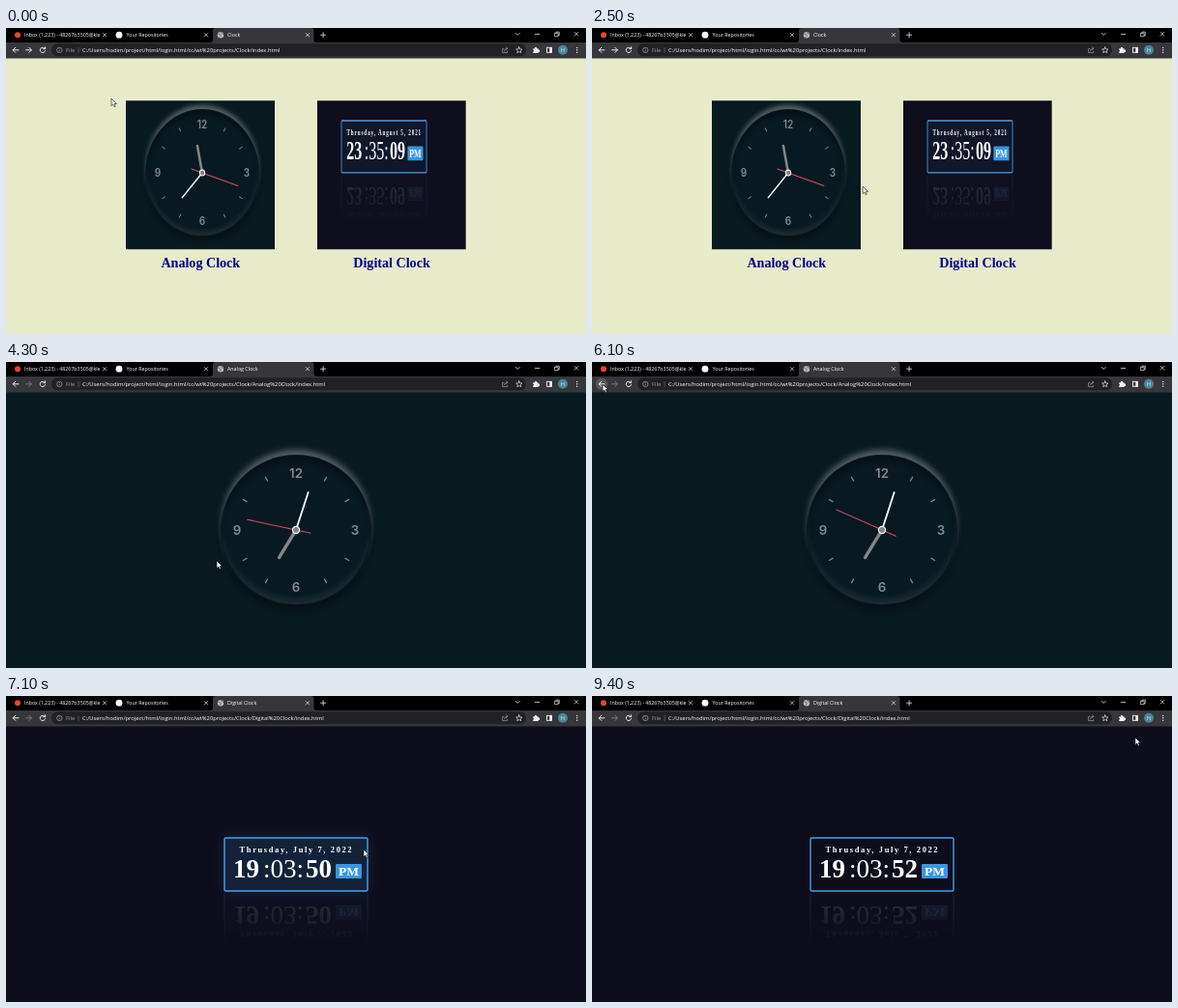
An HTML page that plays this animation: 600 by 317 pixels, repeating every 9500 ms.

```html
<!DOCTYPE html>
<html lang="en">
<head>
<meta charset="utf-8">
<title>Clock</title>
<style>
  html, body { margin: 0; width: 100%; height: 100%; overflow: hidden; background: #000; }
  svg { display: block; width: 100vw; height: 100vh; }
  .ui { font-family: "Open Sans", "Noto Sans", sans-serif; }
  .serif { font-family: "Liberation Serif", "Noto Serif", serif; }
  .caption { font-size: 14.1px; font-weight: 700; fill: #00008b; text-anchor: middle; }
  .num { font: 600 13.3px Inter, sans-serif; fill: #85898d; text-anchor: middle; }
  .line { fill: none; stroke: #e8eaed; stroke-linecap: round; stroke-linejoin: round; }
</style>
</head>
<body>
<svg id="stage" viewBox="0 0 600 317" xmlns="http://www.w3.org/2000/svg"></svg>
<script>
const LOOP = 9500, FRAME = 100;
const ANALOG_AT = 3800, BACK_AT = 6200, DIGITAL_AT = 7000;
const ROOT = 'C:/Users/hodim/project/html/login.html/cc/wt%20projects/Clock/';
const PAGES = {
  index: { title: 'Clock', path: 'index.html' },
  analog: { title: 'Analog Clock', path: 'Analog%20Clock/index.html' },
  digital: { title: 'Digital Clock', path: 'Digital%20Clock/index.html' }
};
// Pointer stops: time, x, y
const STOPS = [
  [0, 109, 73], [1100, 239.5, 110], [1600, 300, 148], [1700, 300, 148],
  [2000, 297, 153], [2200, 297, 153], [3200, 219, 204], [3500, 218, 206],
  [4300, 218, 206], [5800, 11, 23], [6100, 11, 23], [6800, 370, 159],
  [7100, 370, 159], [7600, 292, 182], [8000, 292, 182], [9400, 562, 43]
];

const clamp = v => Math.max(0, Math.min(1, v));
const ease = v => v * v * (3 - 2 * v);
const ramp = (t, from, to) => ease(clamp((t - from) / (to - from)));
const $ = id => document.getElementById(id);

const line = (d, width = 0.9, extra = '') =>
  `<path class="line" d="${d}" stroke-width="${width}" ${extra}/>`;
const cross = (x, y, r) => line(`M${x - r} ${y - r}l${2 * r} ${2 * r}m0 ${-2 * r}l${-2 * r} ${2 * r}`, 0.7);

function label(x, y, text, { size = 5.3, fill = '#fff', id = '', weight = 500, extra = '' } = {}) {
  return `<text x="${x}" y="${y}" font-size="${size}" fill="${fill}" font-weight="${weight}"
    ${id && `id="${id}"`} ${extra}>${text}</text>`;
}

// Clock face and hands centred on 0,0
function face(id) {
  const ticks = [30, 60, 120, 150, 210, 240, 300, 330]
    .map(a => `<path d="M0-58.3V-63.6" stroke="#7d8387" stroke-width="1.3" transform="rotate(${a})"/>`).join('');
  const numbers = [['12', 0, -59.3], ['3', 61, 0], ['6', 0, 59.3], ['9', -61, 0]]
    .map(([n, x, y]) => `<text class="num" x="${x}" y="${y + 4.9}">${n}</text>`).join('');
  const hand = (part, d, color, width) =>
    `<path id="${id}-${part}" d="${d}" stroke="${color}" stroke-width="${width}" stroke-linecap="round"/>`;
  return `<use href="#dial"/>${ticks}${numbers}
    ${hand('hour', 'M0 0V-33.5', '#858585', 3.4)}
    ${hand('minute', 'M0 0V-41', '#fff', 1.8)}
    ${hand('second', 'M0 15.5V-51.5', '#d94f5f', 1.1)}
    <circle r="3.6" fill="#858585" stroke="#fff" stroke-width="1.2"/>`;
}

// Digital display in page coordinates, with its mirror image
function display(id, date, [hours, minutes, seconds]) {
  const big = (x, text, weight, extra) => label(x, 188.3, text, { size: 27, weight, extra });
  return `<rect id="${id}-glow" x="225" y="146" width="150" height="57" rx="2" fill="#329cff" filter="url(#glow)" opacity="0"/>
    <g id="${id}-box" class="serif">
      <rect x="226" y="147" width="148" height="55" rx="1.5" fill="#0e0d1b"/>
      <rect id="${id}-fill" x="226" y="147" width="148" height="55" rx="1.5" fill="#308dd2" opacity="0"/>
      <rect x="226" y="147" width="148" height="55" rx="1.5" fill="none" stroke="#45a0ea" stroke-width="1.4"/>
      ${label(300.4, 162, date, { size: 8.5, weight: 700, extra: 'text-anchor="middle" letter-spacing="1.6"' })}
      ${big(235, hours, 700)}${big(266, ':', 400)}${big(273.5, minutes, 400)}${big(300.5, ':', 400)}
      ${big(310, seconds, 700, `id="${id}-seconds"`)}
      <rect x="341" y="174" width="27" height="15" rx="1" fill="#3597e3"/>
      ${label(344, 186.2, 'PM', { size: 13.5, weight: 700 })}
    </g>
    <g mask="url(#fade)"><use href="#${id}-box" transform="translate(0 405.8) scale(1 -1)"/></g>`;
}

const defs = `<defs>
  <filter id="soft" x="-30%" y="-30%" width="160%" height="160%"><feGaussianBlur stdDeviation="3.4"/></filter>
  <filter id="glow" x="-30%" y="-60%" width="160%" height="220%"><feGaussianBlur stdDeviation="6.5"/></filter>
  <clipPath id="disc"><circle r="77"/></clipPath>
  <clipPath id="tabText"><rect x="18" y="0" width="79" height="14"/></clipPath>
  <linearGradient id="fadeRamp" x1="0" y1="0" x2="0" y2="1">
    <stop stop-color="#fff" stop-opacity=".14"/><stop offset="1" stop-color="#fff" stop-opacity="0"/>
  </linearGradient>
  <mask id="fade" maskUnits="userSpaceOnUse" x="220" y="204.6" width="160" height="57">
    <rect x="220" y="204.6" width="160" height="57" fill="url(#fadeRamp)"/>
  </mask>
  <g id="dial">
    <circle cy="6.7" r="78" fill="#000" opacity=".3" filter="url(#soft)"/>
    <circle cy="-6" r="77" fill="#fff" opacity=".3" filter="url(#soft)"/>
    <circle r="78" fill="#091921"/>
    <g clip-path="url(#disc)" fill-rule="evenodd">
      <path d="M-110-110H110V110H-110ZM-78 6.7a78 78 0 1 0 156 0a78 78 0 1 0-156 0" opacity=".35" filter="url(#soft)"/>
      <path d="M-110-110H110V110H-110ZM-78-6.7a78 78 0 1 0 156 0a78 78 0 1 0-156 0" fill="#fff" opacity=".08" filter="url(#soft)"/>
    </g>
  </g>
</defs>`;

const pages = `
<g id="index">
  <rect y="31" width="600" height="286" fill="#e8ebca"/>
  <g id="analogCard">
    <svg x="124" y="75.3" width="154" height="154" viewBox="124 75.3 154 154">
      <rect x="124" y="75" width="154" height="155" fill="#091920"/>
      <g transform="translate(203 150) scale(.755 .845)">${face('small')}</g>
    </svg>
    <text class="serif caption" x="201.3" y="248.4">Analog Clock</text>
  </g>
  <g id="digitalCard">
    <rect x="322" y="75.3" width="153.7" height="154" fill="#0f0e1c"/>
    <g transform="translate(347 96) scale(.595 .98) translate(-226 -147)">
      ${display('mini', 'Thrusday, August 5, 2021', ['23', '35', '09'])}
    </g>
    <text class="serif caption" x="399" y="248.4">Digital Clock</text>
  </g>
</g>
<g id="analog">
  <rect y="31" width="600" height="286" fill="#091920"/>
  <g transform="translate(300 174)">${face('large')}</g>
</g>
<g id="digital">
  <rect y="31" width="600" height="286" fill="#0e0d1b"/>
  ${display('full', 'Thrusday, July 7, 2022', ['19', '03', '50'])}
</g>`;

const browser = `
<g class="ui">
  <rect width="600" height="15" fill="#000"/>
  <path d="M211 15q3 0 3-3V3q0-3 3-3H315.5q3 0 3 3v9q0 3 3 3z" fill="#37363a"/>
  <rect y="15" width="600" height="16.5" fill="#37363a"/>
  <circle cx="12" cy="7.2" r="3" fill="#ea4335"/>
  <g clip-path="url(#tabText)">${label(19, 9.2, 'Inbox (1,223) - 48267b3505@kle')}</g>
  <circle cx="117" cy="7.2" r="3.4" fill="#fff"/>
  ${label(124.5, 9.2, 'Your Repositories')}
  <circle cx="222" cy="7.2" r="3.2" fill="#b9bcc1"/>
  ${line('M219.6 6q2 0 2.4 1.3t-.8 2.2M222.5 4.3q0 1.6 2 2', 0.8, 'style="stroke:#55565a"')}
  ${label(229, 9.2, 'Clock', { id: 'title' })}
  ${[102, 207, 312].map(x => cross(x, 7.2, 1.7)).join('')}
  ${line('M325.6 7.2h5m-2.5-2.5v5', 0.8)}
  ${line('M527.3 5.4l2 2 2-2', 0.8)}${line('M547.4 6.4h4.4', 0.8)}
  ${line('M567.8 5.3h3.4v3.4h-3.4zM569 5.2V4.1h3.3v3.4h-1', 0.7)}
  ${cross(590, 6.2, 1.9)}

  <circle id="backHover" cx="10" cy="22.8" r="6.2" fill="#56565b"/>
  ${line('M13 22.8H7.2m2.6-2.6L7.2 22.8l2.6 2.6', 1)}
  ${line('M20.6 22.8h5.8m-2.6-2.6l2.6 2.6-2.6 2.6', 1, 'id="forward"')}
  ${line('M40.2 21.3a2.7 2.7 0 1 0 .4 2.3M40.6 19.7v1.9h-1.9', 1)}
  <rect x="47" y="16.3" width="491" height="13" rx="6.5" fill="#202124"/>
  <circle cx="55.3" cy="22.9" r="2.7" fill="none" stroke="#a3a7ac" stroke-width=".7"/>
  <path d="M55.3 22.5v1.8M55.3 21.1v.7" stroke="#a3a7ac" stroke-width=".7"/>
  ${label(62, 25, 'File', { size: 5.8, fill: '#9aa0a6' })}
  <path d="M75 20v6" stroke="#6d7075" stroke-width=".6"/>
  ${label(79, 25, '', { size: 5.82, id: 'url' })}
  ${line('M515 21.4h-1.4v4.2h5v-1.4M515.4 23.8q.3-2.6 3.4-2.7m-1.3-1.3l1.4 1.3-1.4 1.4', 0.7, 'style="stroke:#9aa0a6"')}
  ${line('M530.8 19.8l.9 2 2.2.2-1.6 1.5.5 2.2-2-1.2-2 1.2.5-2.2-1.6-1.5 2.2-.2z', 0.7)}
  <path d="M545.3 21.2h1.7a1.1 1.1 0 1 1 2 0h1.6v1.6a1.1 1.1 0 1 1 0 2v1.3h-5.3v-1.5a1 1 0 0 0 0-1.9z" fill="#f1f3f4"/>
  <rect x="559.5" y="20.3" width="5" height="5" fill="none" stroke="#f1f3f4" stroke-width=".9"/>
  <path d="M562.3 20h2.4v5.6h-2.4z" fill="#f1f3f4"/>
  <circle cx="576" cy="22.8" r="5" fill="#47869b"/>
  ${label(576, 24.9, 'H', { extra: 'text-anchor="middle"' })}
  ${[20.4, 22.8, 25.2].map(y => `<circle cx="590.7" cy="${y}" r=".7" fill="#e8eaed"/>`).join('')}
</g>`;

const pointers = `
<path id="arrow" d="M0 0V7.6L1.8 6 3 8.7 4.3 8.1 3.1 5.5H5.5Z" fill="#fff" stroke="#111" stroke-width=".6"/>
<path id="hand" d="M-.8.6Q0-.5.8.6V3.4L3.4 4Q4.4 4.3 4.2 5.4L3.4 9.2H-1L-3.2 6Q-3.4 4.7-2.3 5L-.8 6.2Z"
  fill="#fff" stroke="#111" stroke-width=".6"/>`;

$('stage').innerHTML = defs + pages + browser + pointers;

function show(id, on) { $(id).style.display = on ? '' : 'none'; }

function setHands(id, hour, minute, second) {
  const angles = { hour: hour * 30 + minute / 2, minute: minute * 6, second: second * 6 };
  for (const part in angles) $(`${id}-${part}`).setAttribute('transform', `rotate(${angles[part]})`);
}

function lift(id, x, amount) {
  $(id).setAttribute('transform', `translate(${x} 153) scale(${1 + 0.042 * amount}) translate(${-x} -153)`);
}

function pointerAt(t) {
  const next = STOPS.findIndex(stop => stop[0] > t);
  if (next < 0) return STOPS.at(-1).slice(1);
  const [t0, x0, y0] = STOPS[next - 1], [t1, x1, y1] = STOPS[next];
  const k = ramp(t, t0, t1);
  return [x0 + (x1 - x0) * k, y0 + (y1 - y0) * k];
}

function pageAt(t) {
  if (t >= DIGITAL_AT) return 'digital';
  return t >= ANALOG_AT && t < BACK_AT ? 'analog' : 'index';
}

function render(t) {
  const page = pageAt(t);
  for (const id in PAGES) show(id, id === page);
  $('title').textContent = PAGES[page].title;
  $('url').textContent = ROOT + PAGES[page].path;
  $('forward').style.stroke = page === 'index' ? '' : '#77787c';
  show('backHover', t >= 5700 && t < BACK_AT);

  lift('analogCard', 201, ramp(t, 2600, 3000) * (t < ANALOG_AT));
  lift('digitalCard', 399, ramp(t, 6500, 6900));
  setHands('large', 7, 3, 47 + Math.floor((t - 3700) / 1000));

  const glow = clamp((t - 7020) / 500) - clamp((t - 8500) / 450);
  $('full-fill').setAttribute('opacity', glow);
  $('full-glow').setAttribute('opacity', glow);
  $('full-seconds').textContent = 50 + Math.max(0, Math.floor((t - DIGITAL_AT) / 1000));

  const [x, y] = pointerAt(t);
  const linked = (t >= 2700 && t < ANALOG_AT) || (t >= 6500 && t < DIGITAL_AT);
  for (const id of ['arrow', 'hand']) {
    $(id).setAttribute('transform', `translate(${x} ${y})`);
    show(id, (id === 'hand') === linked);
  }
}

setHands('small', 11, 37, 18);
$('mini-fill').setAttribute('opacity', 0.08);

const start = performance.now();
function tick() {
  const t = (performance.now() - start) % LOOP;
  render(Math.floor(t / FRAME) * FRAME);
  requestAnimationFrame(tick);
}
tick();
</script>
</body>
</html>
```
